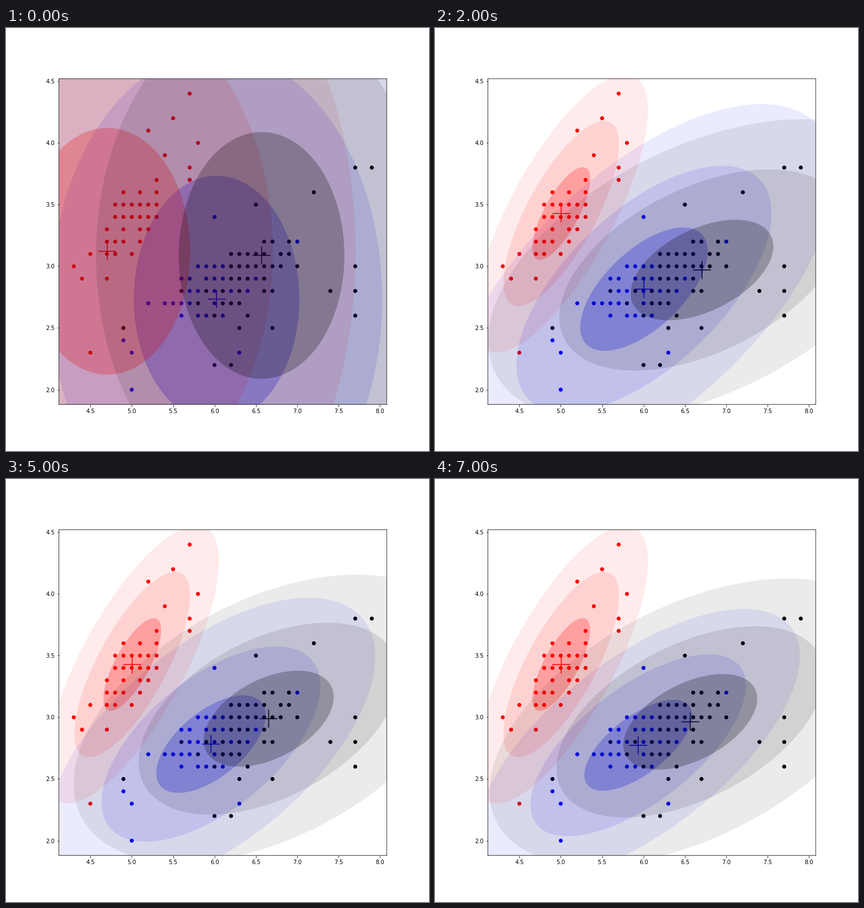
A matplotlib script that plays this animation: 748 by 748 pixels, repeating every 8 s.

```python
import numpy as np
import matplotlib.pyplot as plt
from matplotlib.animation import FuncAnimation
from matplotlib.patches import Ellipse

SIZE, DPI, STEPS = 748, 72, 8
COLORS = ("blue", "red", "black")  # stacking order, bottom to top
ALPHAS = {1: 0.24, 2: 0.105, 3: 0.08}  # opacity per sigma level

# Gaussians: mean x, mean y, sigma x, sigma y, correlation
START = {"blue": (6.025, 2.734), "red": (4.705, 3.122), "black": (6.569, 3.088)}
KEY_STEPS = (1, 2, 5, 7)
KEYS = {
    "blue": [(6.016, 2.804, 0.806, 0.492, 0.635),
             (6.005, 2.815, 0.770, 0.500, 0.615),
             (5.957, 2.783, 0.661, 0.3955, 0.595),
             (5.936, 2.773, 0.651, 0.3685, 0.655)],
    "red": [(5.006, 3.428, 0.349, 0.3755, 0.742)],
    "black": [(6.620, 2.970, 0.994, 0.415, 0.515),
              (6.707, 2.970, 0.862, 0.4075, 0.470),
              (6.654, 2.989, 0.7855, 0.389, 0.450),
              (6.565, 2.963, 0.8085, 0.3875, 0.485)],
}

# Dots: core Gaussian, number of core dots, and the outlying dots
DOTS = {
    "red": ((4.98, 3.36, 0.28, 0.25, 0.65), 30,
            [(5.7, 4.4), (5.5, 4.2), (5.2, 4.1), (5.8, 4.0), (5.4, 3.9),
             (5.7, 3.8), (4.5, 2.3), (4.3, 3.0), (4.4, 2.9)]),
    "blue": ((5.87, 2.78, 0.35, 0.17, 0.5), 24,
             [(5.0, 2.0), (6.0, 3.4), (7.0, 3.2), (6.3, 2.3), (5.0, 2.3),
              (4.9, 2.4), (5.2, 2.7)]),
    "black": ((6.4, 2.95, 0.42, 0.24, 0.4), 36,
              [(7.7, 3.8), (7.9, 3.8), (7.2, 3.6), (7.7, 2.6), (7.7, 2.8),
               (7.4, 2.8), (7.7, 3.0), (4.9, 2.5), (6.7, 2.5), (6.2, 2.2),
               (6.0, 2.2)]),
}


def covariance(sx, sy, rho):
    return np.array([[sx * sx, rho * sx * sy], [rho * sx * sy, sy * sy]])


def scatter_dots(rng):
    """Distinct dots on a 0.1 grid, likelier near the core of each cluster."""
    taken = {dot for _, _, outliers in DOTS.values() for dot in outliers}
    grid = [(x / 10, y / 10) for x in range(43, 77) for y in range(22, 40)]
    dots, colors = [], []
    for color, ((x, y, *shape), count, outliers) in DOTS.items():
        free = [dot for dot in grid if dot not in taken]
        offset = np.array(free) - (x, y)
        precision = np.linalg.inv(covariance(*shape))
        distance = np.einsum("ni,ij,nj->n", offset, precision, offset)
        rank = np.argsort(distance / 2 - rng.gumbel(0, 0.5, len(free)))
        core = [free[i] for i in rank[:count]]
        taken.update(core)
        dots += core + outliers
        colors += [color] * (count + len(outliers))
    return np.array(dots), colors


def gaussian(color, step):
    """Unit circle at first, then a polynomial through the key Gaussians."""
    if step == 0:
        return *START[color], 1, 1, 0
    keys = KEYS[color]
    degree = len(keys) - 1
    coefs = np.polyfit(KEY_STEPS[:len(keys)], keys, degree)
    return (np.vander([step], degree + 1) @ coefs)[0]


def ellipse_axes(shape):
    """Full one-sigma axes and angle of a covariance ellipse."""
    values, vectors = np.linalg.eigh(covariance(*shape))
    minor, major = 2 * np.sqrt(values)
    return major, minor, np.degrees(np.arctan2(vectors[1, 1], vectors[0, 1]))


plt.rcParams["path.snap"] = False
fig, ax = plt.subplots(figsize=(SIZE / DPI, SIZE / DPI), dpi=DPI)
fig.subplots_adjust(left=0.125, right=0.9, bottom=0.11, top=0.88)
ax.set_xlim(4.12, 8.08)
ax.set_ylim(1.88, 4.52)

dots, dot_colors = scatter_dots(np.random.default_rng(4))
ax.scatter(*dots.T, c=dot_colors, zorder=1)
crosses = ax.scatter([0] * 3, [0] * 3, s=1000, marker="+", c=COLORS, zorder=1.2)
rings = {color: {k: ax.add_patch(Ellipse((0, 0), 1, 1, fc=color, lw=0,
                                         alpha=alpha, zorder=1.5))
                 for k, alpha in ALPHAS.items()}
         for color in COLORS}


def update(step):
    means = []
    for color, levels in rings.items():
        x, y, *shape = gaussian(color, step)
        means.append((x, y))
        major, minor, angle = ellipse_axes(shape)
        for k, ring in levels.items():
            ring.set(center=(x, y), width=k * major, height=k * minor,
                     angle=angle)
    crosses.set_offsets(means)
    return [crosses]


anim = FuncAnimation(fig, update, frames=STEPS, interval=1000,
                     init_func=lambda: update(0), repeat=True, repeat_delay=0)
plt.show()
```
